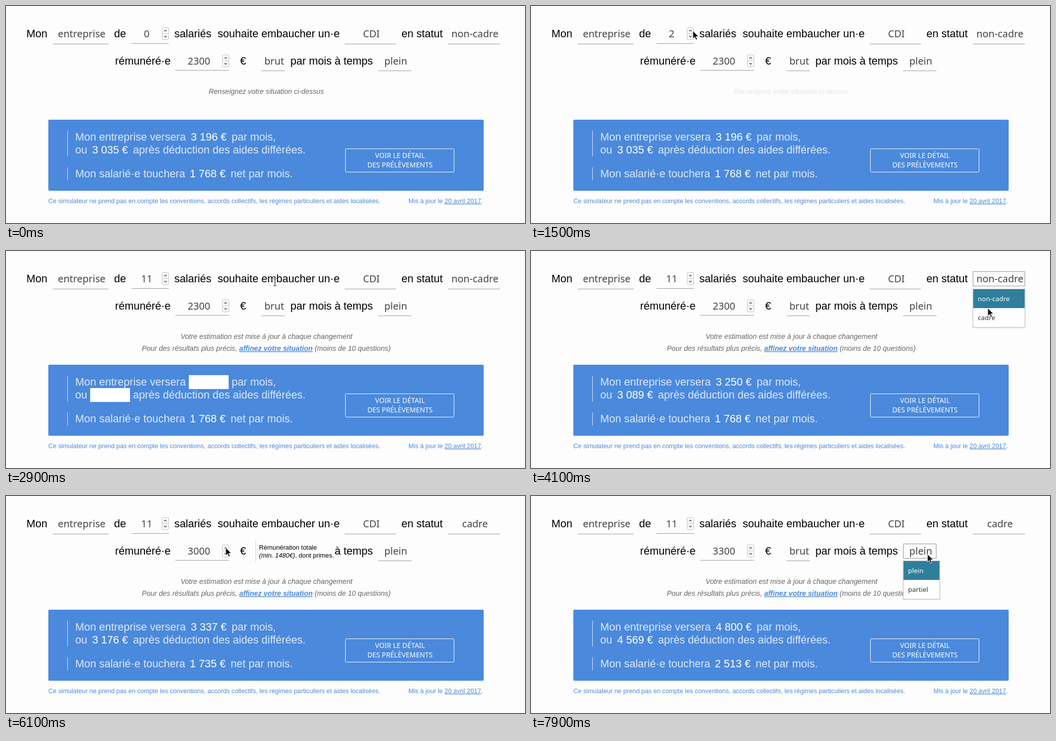
Recreate the animation shown at these times as an HTML page. Size 1042x437 px, loop 8 s.

```html
<!DOCTYPE html>
<html lang="fr">
<head>
<meta charset="utf-8">
<title>Simulateur d'embauche</title>
<style>
html, body { margin: 0; width: 100%; height: 100%; overflow: hidden; background: #fdfdfd; }
svg { display: block; width: 100%; height: 100%; }
text { font: 21.6px "Liberation Sans", Arial, sans-serif; }
.field { font: 19.8px "Noto Sans", sans-serif; fill: #444; text-anchor: middle; }
.lines { stroke: #9a9a9a; }
.spin { fill: #fff; stroke: #bbb; }
.hint text { font-size: 14.3px; font-style: italic; fill: #666; text-anchor: middle; }
.hint .link { font-weight: bold; fill: #4a89dc; text-decoration: underline; }
.result text { fill: #dfe9f8; }
.result .value { fill: #fff; }
.button text { font: 13.9px "Noto Sans", sans-serif; fill: #fff; text-anchor: middle; }
.foot text { font-size: 12.8px; fill: #4a89dc; }
.tip text { font-size: 12.9px; }
.menu text { font: 13.4px "Noto Sans", sans-serif; fill: #333; }
.menu .on { fill: #fff; }
.focus { fill: none; stroke: #222; stroke-dasharray: 1 1; }
</style>
</head>
<body>
<svg viewBox="0 0 1042 437" xmlns="http://www.w3.org/2000/svg">
  <defs>
    <g id="spinner">
      <rect class="spin" x=".5" y=".5" width="13" height="12" rx="2"/>
      <rect class="spin" x=".5" y="12.5" width="13" height="12" rx="2"/>
      <path d="M4.5 8 7 5.5 9.5 8M4.5 17 7 19.5 9.5 17" fill="none" stroke="#444" stroke-width="1.3"/>
    </g>
  </defs>
  <rect width="1042" height="437" fill="#fdfdfd"/>

  <g>
    <text x="41" y="63">Mon</text>
    <text x="217" y="63">de</text>
    <text x="338" y="63">salariés</text>
    <text x="425" y="63">souhaite embaucher un·e</text>
    <text x="794" y="63">en statut</text>
    <text x="219" y="118">rémunéré·e</text>
    <text x="470" y="118">€</text>
    <text x="571" y="118">par mois à temps</text>
  </g>
  <path class="lines" d="M94 76.5H206M252 75.5H327M680 76.5H783M887 76.5H992M340 129.5H448M513 130.5H560M747 130.5H814"/>
  <text class="field" x="152" y="63">entreprise</text>
  <text class="field" id="staff" x="282.5" y="63"></text>
  <text class="field" x="733.5" y="63">CDI</text>
  <text class="field" id="status" x="941.5" y="63"></text>
  <text class="field" id="salary" x="387.5" y="118"></text>
  <text class="field" x="538.5" y="118">brut</text>
  <text class="field" x="782.5" y="118">plein</text>
  <use href="#spinner" x="313" y="43"/>
  <use href="#spinner" x="434" y="98"/>
  <rect class="focus" id="statusFocus" x="887.5" y="41.5" width="104" height="29"/>
  <rect class="focus" id="timeFocus" x="747.5" y="96.5" width="66" height="29"/>

  <g class="tip" id="tip">
    <rect x="501" y="90" width="159" height="44" fill="#fdfdfd"/>
    <path d="M501.5 90V134" stroke="#ccc"/>
    <text x="508" y="108">Rémunération totale</text>
    <text x="508" y="124"><tspan font-style="italic">(min. 1480€)</tspan>, dont primes.</text>
  </g>

  <g class="hint" id="hintStart">
    <text x="522.5" y="177" style="font-size:14.2px">Renseignez votre situation ci-dessus</text>
  </g>
  <g class="hint" id="hintNext">
    <text x="523" y="177">Votre estimation est mise à jour à chaque changement</text>
    <text x="522.5" y="201">Pour des résultats plus précis, <tspan class="link">affinez votre situation</tspan> (moins de 10 questions)</text>
  </g>

  <rect x="85" y="229" width="874" height="143" rx="2" fill="#4a89dc"/>
  <path d="M123.5 251V303M123.5 325V351" stroke="#dfe9f8"/>
  <g class="result">
    <text x="139" y="271">Mon entreprise versera</text>
    <text x="453" y="271">par mois,</text>
    <text x="139" y="297">ou</text>
    <text x="255" y="297">après déduction des aides différées.</text>
    <text x="139" y="345">Mon salarié·e touchera</text>
    <text x="451" y="345">net par mois.</text>
    <g id="values"></g>
  </g>
  <g class="button">
    <rect x="681.5" y="287.5" width="218" height="47" rx="2" fill="none" stroke="#fff"/>
    <text x="791" y="306">VOIR LE DÉTAIL</text>
    <text x="791" y="325">DES PRÉLÈVEMENTS</text>
  </g>
  <g class="foot">
    <text x="85" y="397">Ce simulateur ne prend pas en compte les conventions, accords collectifs, les régimes particuliers et aides localisées.</text>
    <text x="808" y="397">Mis à jour le <tspan text-decoration="underline">20 avril 2017</tspan>.</text>
  </g>

  <g class="menu" id="statusMenu"></g>
  <g class="menu" id="timeMenu"></g>

  <path id="arrow" d="M0 0V16L3.8 12.6 6.3 18.3 8.9 17.1 6.4 11.6H11.5Z" fill="#111" stroke="#fff" stroke-width=".9"/>
  <g id="beam" fill="none">
    <path d="M-3-7H3M0-7V7M-3 7H3" stroke="#fff" stroke-width="3"/>
    <path d="M-3-7H3M0-7V7M-3 7H3" stroke="#222" stroke-width="1.2"/>
  </g>
</svg>
<script>
const LOOP = 8000, STEP = 100;
const $ = id => document.getElementById(id);
const clamp = v => Math.max(0, Math.min(1, v));
const show = (id, on) => $(id).setAttribute('visibility', on ? 'visible' : 'hidden');
const fade = (id, o) => $(id).setAttribute('opacity', o);
const steps = (t, start, gap, max) => t < start ? 0 : Math.min(max, 1 + Math.floor((t - start) / gap));

// Amounts: box position, then one value per result
const amounts = [
  { x: 367, y: 250, v: ['3 196 €', '3 250 €', '3 337 €', '4 800 €'] },
  { x: 169, y: 276, v: ['3 035 €', '3 089 €', '3 176 €', '4 569 €'] },
  { x: 365, y: 324, v: ['1 768 €', '1 768 €', '1 735 €', '2 513 €'] }
];
const updates = [0, 2900, 4900, 6400];
const FLASH = 700;

// Pointer path: time, x, y
const path = [
  [300, 400, 30], [1000, 325, 50], [2500, 325, 50], [2900, 540, 63],
  [3200, 740, 42], [3600, 914, 50], [3800, 914, 56], [4100, 917, 115],
  [4400, 916, 134], [4600, 916, 134], [5200, 520, 137], [5600, 441, 104],
  [6500, 441, 104], [6900, 450, 116], [7600, 796, 117], [8000, 796, 117]
];

$('values').innerHTML = amounts.map(({ x, y }) =>
  `<rect x="${x}" y="${y}" width="80" height="28" fill="#fff"/><text class="value" x="${x + 4}" y="${y + 21}"></text>`).join('');
const boxes = $('values').querySelectorAll('rect');
const labels = $('values').querySelectorAll('text');

function buildMenu(id, x, y, w, items) {
  $(id).innerHTML =
    `<rect x="${x - 1}" y="${y}" width="${w + 2}" height="79.5" rx="2" fill="#000" opacity=".12"/>
     <rect x="${x + .5}" y="${y + .5}" width="${w - 1}" height="77" fill="#fff" stroke="#ccc"/>
     <rect x="${x + 1}" y="${y + 1}" width="${w - 2}" height="38" fill="#2f7f9c"/>` +
    items.map((s, i) => `<text class="${i ? '' : 'on'}" x="${x + 10}" y="${y + 25 + 38 * i}">${s}</text>`).join('');
}
buildMenu('statusMenu', 887, 76, 105, ['non-cadre', 'cadre']);
buildMenu('timeMenu', 747, 130, 74, ['plein', 'partiel']);

function pointer(t) {
  const i = Math.max(1, path.findIndex(p => p[0] > t));
  const [t0, x0, y0] = path[i - 1], [t1, x1, y1] = path[i];
  const p = clamp((t - t0) / (t1 - t0)), k = p * p * (3 - 2 * p);
  const beam = t > 2600 && t < 3500;
  const place = `translate(${x0 + (x1 - x0) * k} ${y0 + (y1 - y0) * k})`;
  for (const id of ['arrow', 'beam']) $(id).setAttribute('transform', place);
  show('arrow', t >= path[0][0] && !beam);
  show('beam', beam);
}

function draw(t) {
  $('staff').textContent = t < 1450 ? steps(t, 1200, 250, 1) : 1 + steps(t, 1450, 110, 10);
  $('salary').textContent = 2300 + 100 * steps(t, 5700, 65, 10);
  $('status').textContent = t < 4600 ? 'non-cadre' : 'cadre';

  fade('hintStart', clamp((1560 - t) / 400));
  fade('hintNext', clamp((t - 1600) / 400));

  const n = updates.filter(u => u <= t).length - 1;
  const glow = n ? (1 - clamp((t - updates[n]) / FLASH)) ** 2 : 0;
  amounts.forEach(({ v }, i) => {
    labels[i].textContent = v[n];
    boxes[i].setAttribute('opacity', n && v[n] !== v[n - 1] ? glow : 0);
  });

  show('statusFocus', t >= 3800 && t < 5700);
  show('statusMenu', t >= 3800 && t < 4600);
  show('tip', t >= 5700 && t < 7700);
  show('timeFocus', t >= 7700);
  show('timeMenu', t >= 7700);
  pointer(t);
}

const start = performance.now();
function tick() {
  const t = (performance.now() - start) % LOOP;
  draw(Math.floor(t / STEP) * STEP);
  requestAnimationFrame(tick);
}
tick();
</script>
</body>
</html>
```
